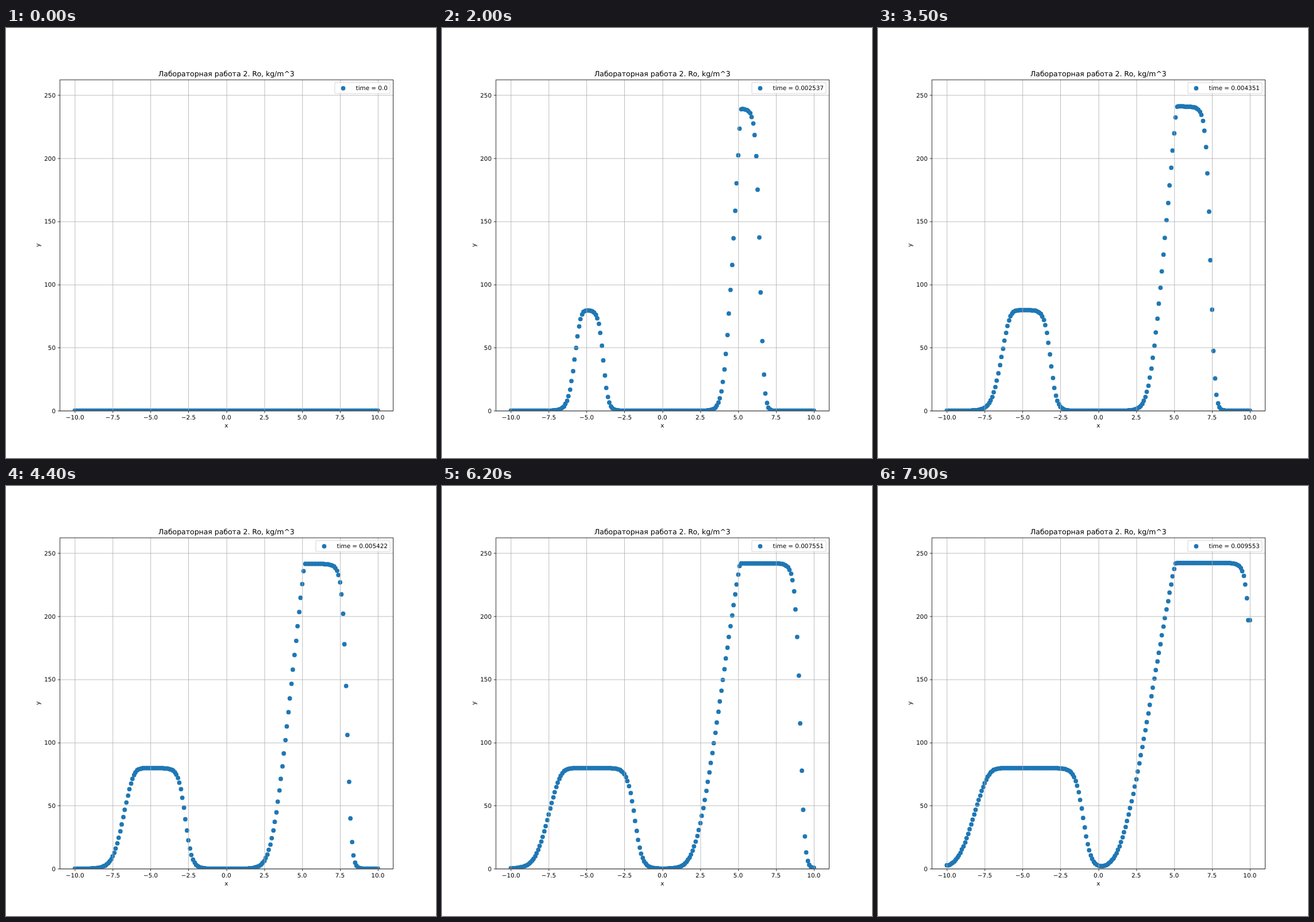
An HTML page that plays this animation: 748 by 748 pixels, repeating every 8 s.

```html
<!DOCTYPE html>
<html lang="ru">
<head>
<meta charset="utf-8">
<title>Лабораторная работа 2</title>
<style>
  html, body { margin: 0; width: 100%; height: 100%; overflow: hidden; background: #fff; }
  svg { display: block; width: 100vw; height: 100vh; }
  text { font: 13.89px "DejaVu Sans", sans-serif; text-rendering: geometricPrecision; }
  .title { font-size: 16.67px; }
  .middle { text-anchor: middle; }
  .end { text-anchor: end; }
  .grid { stroke: #b0b0b0; stroke-width: 1.11; }
  .axis { stroke: #000; stroke-width: 1.11; fill: none; }
  .dot { fill: #1f77b4; }
  .box { fill: #fff; fill-opacity: .8; stroke: #ccc; stroke-opacity: .8; stroke-width: 1.39; }
</style>
</head>
<body>
<svg viewBox="0 0 1000 1000">
  <clipPath id="area"><rect x="125" y="120" width="775" height="770"/></clipPath>
  <g id="dots" clip-path="url(#area)"></g>
  <g id="axes"></g>
  <rect class="axis" x="125.5" y="120.5" width="775" height="770"/>
  <text class="title middle" x="512.5" y="111.7">Лабораторная работа 2. Ro, kg/m^3</text>
  <text class="middle" x="512.5" y="929.5">x</text>
  <text class="middle" transform="translate(79.5 505) rotate(-90)">y</text>
  <rect id="box" class="box" y="127" height="25.5" rx="2.8"/>
  <circle id="key" class="dot" cy="140.2" r="5.21"/>
  <text id="label" class="end" x="887.5" y="144.4"></text>
</svg>
<script>
const LOOP = 8000, STEP = 100, EM = 13.89;
const { exp, log, sqrt, round } = Math;
const byId = id => document.getElementById(id);
const toX = x => 512.5 + 35.227 * x;
const toY = u => 890 - 2.9345 * u;
const sigmoid = v => 1 / (1 + exp(-v));

function add(parent, name, attrs, text = '') {
  const node = document.createElementNS('http://www.w3.org/2000/svg', name);
  for (const key in attrs) node.setAttribute(key, attrs[key]);
  node.textContent = text;
  return parent.appendChild(node);
}

function line(cls, x1, y1, x2, y2) {
  add(byId('axes'), 'line', { class: cls, x1, y1, x2, y2 });
}

function label(cls, x, y, text) {
  add(byId('axes'), 'text', { class: cls, x, y }, text);
}

for (let v = -10; v <= 10; v += 2.5) {
  const x = round(toX(v)) + .5;
  line('grid', x, 120, x, 890);
  line('axis', x, 890.5, x, 895.4);
  label('middle', toX(v), 910.5, v.toFixed(1).replace('-', '\u2212'));
}
for (let v = 0; v <= 250; v += 50) {
  const y = round(toY(v)) + .5;
  line('grid', 125, y, 900, y);
  line('axis', 120.6, y, 125.5, y);
  label('end', 115.3, toY(v) + 5.1, v);
}

// Physical time in ms; the solver's step shrinks as the flow speeds up.
const physicalTime = k => .11742 * k + .3985 - .2188 * exp(-.0505 * k) - .1797 * exp(-k / 6.23);

// Each fraction q of a fan's top speed travels partly like t (wave) and partly like sqrt(t) (diffusion).
const leftReach = (q, t) => (.39 - .04 * q - .04 * q * q) * t
  - (.095 + .145 * log(q) - .06 * log(1 - q)) * sqrt(t);
const rightReach = (q, t) => (.34 - .255 * q - .035 * q * q) * t
  - (.137 + .125 * log(q) - .006 * log(1 - q)) * sqrt(t);

// Finds by bisection the fraction whose reach is the given distance.
function fraction(reach, distance, t) {
  let low = 0, high = 1;
  for (let i = 0; i < 24; i++) {
    const q = (low + high) / 2;
    if (reach(q, t) > distance) low = q; else high = q;
  }
  return (low + high) / 2;
}

// Shock fronts widen like sqrt(t) and settle to a steady thickness.
const sharpness = (t, settle) => 1 / sqrt(1 - exp(-t / settle));

function velocity(x, t) {
  if (t <= 0) return 0;
  const l = x + 4.951 - .414 * t;
  const r = Math.max(-2.5, x - 5.102 - .5275 * t);
  const left = 79.7 * fraction(leftReach, -4.95 - x, t) * sigmoid(-3.19 * sharpness(t, 8) * l);
  const right = (243.5 - 10 / t) * fraction(rightReach, 5.05 - x, t)
    * sigmoid(-sharpness(t, 1.8) * r * (6.364 + 1.227 * r));
  return left + right;
}

const dots = Array.from({ length: 201 }, (_, i) => {
  const x = -10 + i / 10;
  const node = add(byId('dots'), 'circle', { class: 'dot', cx: round(toX(x)), r: 5.21 });
  // End cells copy their neighbours.
  return { node, x: Math.max(-9.9, Math.min(9.9, x)) };
});

let shown = -1;
function draw(now) {
  const step = Math.max(0, Math.floor(now % LOOP / STEP) - 1);
  if (step === shown) return;
  shown = step;
  const t = step && physicalTime(step);
  for (const { node, x } of dots) node.setAttribute('cy', round(toY(velocity(x, t))));

  const value = step ? String(Number((t / 1000).toFixed(6))) : '0.0';
  const left = 764.7 - (value.length - 3) * .636 * EM;
  byId('label').textContent = 'time = ' + value;
  byId('box').setAttribute('x', left);
  byId('box').setAttribute('width', 893 - left);
  byId('key').setAttribute('cx', left + 1.4 * EM);
}

const start = performance.now();
function tick() {
  draw(performance.now() - start);
  requestAnimationFrame(tick);
}
tick();
</script>
</body>
</html>
```
